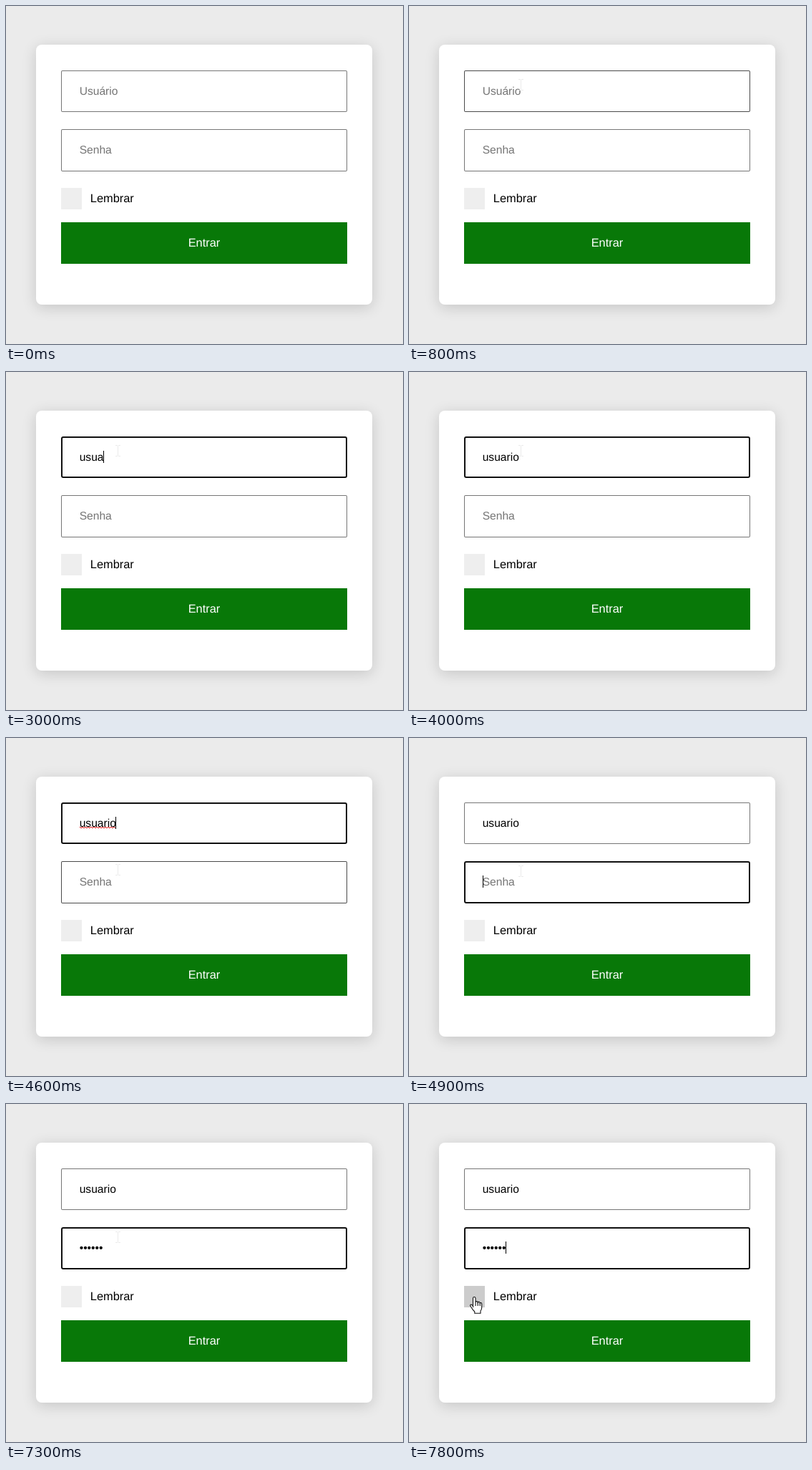
These frames come from a looping animation (555 by 472 pixels, 8000 ms). An HTML page with a canvas:

```html
<!DOCTYPE html>
<html lang="pt">
<head>
<meta charset="utf-8">
<title>Login</title>
<style>
  html, body { margin: 0; width: 100%; height: 100%; overflow: hidden; background: #ebebeb; }
  canvas { display: block; }
</style>
</head>
<body>
<canvas id="stage" width="555" height="472"></canvas>
<script>
const ctx = document.getElementById('stage').getContext('2d');
const LOOP = 8000, STEP = 100;
const FAMILY = '"Liberation Sans", Arial, sans-serif';
const TEXT_X = 102.7;

const userField = { y: 90, h: 58, hint: 'Usuário', value: 'usuario', keys: [1800, 2400, 2800, 3000, 3200, 3400, 3500] };
const passField = { y: 172, h: 59, hint: 'Senha', value: '••••••', keys: [5700, 6000, 6200, 6400, 6600, 6800] };
const FOCUS_USER = 1000, FOCUS_PASS = 4900;
const caretOff = [[1500, 1800], [2300, 2400], [4000, 4100], [5400, 5700], [7300, 7800]];

// time, x, y of the pointer
const pointerPath = [
  [500, 156, 97], [600, 156, 103], [800, 156, 110],
  [4200, 156, 110], [4300, 156, 122], [4400, 156, 142], [4500, 156, 174], [4600, 156, 184], [4900, 156, 186],
  [7400, 156, 186], [7500, 140, 204], [7600, 120, 228], [7700, 100, 260], [7800, 91, 269]
];

const hand = new Path2D('M4.5 15V2.2Q4.5 .5 6.2 .5T8 2.2V8Q8.2 6.6 9.6 6.6T11.2 8.2Q11.6 7.2 12.8 7.4T14.2 9' +
  'Q14.8 8.2 15.7 8.6T16.7 10.4V15.5Q16.6 18 15 20V23.2H6.8V21Q4 18.5 2.6 15.8L.7 12.9Q.3 11 2 11Q3.4 11.6 4.5 13.2Z');
const knuckles = new Path2D('M8 8V13M11.2 8.2V13M14.2 9V13');

function box(x, y, w, h, r, color) {
  ctx.fillStyle = color;
  ctx.beginPath();
  ctx.roundRect(x, y, w, h, r);
  ctx.fill();
}

function text(str, x, y, size, color, align = 'left') {
  ctx.font = size + 'px ' + FAMILY;
  ctx.textAlign = align;
  ctx.fillStyle = color;
  ctx.fillText(str, x, y);
}

function pointerAt(t) {
  if (t < pointerPath[0][0]) return null;
  const i = pointerPath.findIndex(p => p[0] > t);
  if (i < 0) {
    const [, x, y] = pointerPath[pointerPath.length - 1];
    return { x, y };
  }
  const [t0, x0, y0] = pointerPath[i - 1], [t1, x1, y1] = pointerPath[i];
  const k = (t - t0) / (t1 - t0);
  return { x: x0 + (x1 - x0) * k, y: y0 + (y1 - y0) * k };
}

const over = (p, y, h) => p !== null && p.y >= y && p.y < y + h;

function drawField(f, t, focused, hovered) {
  const line = focused ? 2 : 1;
  box(77, f.y, 400, f.h, focused ? 3 : 2, focused ? '#101010' : hovered ? '#4a4a4a' : '#767676');
  box(77 + line, f.y + line, 400 - 2 * line, f.h - 2 * line, 1, '#fff');

  const typed = f.value.slice(0, f.keys.filter(k => k <= t).length);
  const base = f.y + 34;
  text(typed || f.hint, TEXT_X, base, 15.6, typed ? '#000' : '#757575');

  if (focused && !caretOff.some(([a, b]) => t >= a && t < b)) {
    const x = typed ? Math.floor(TEXT_X + ctx.measureText(typed).width) : 103;
    ctx.fillStyle = '#000';
    ctx.fillRect(x, f.y + 20, 1, 17);
  }
}

function drawSquiggle(x0, x1, y) {
  ctx.beginPath();
  for (let x = x0, i = 0; x <= x1; x += 2, i++) ctx.lineTo(x, y + (i % 2 ? 1 : -1));
  ctx.strokeStyle = '#e01010';
  ctx.lineWidth = 1;
  ctx.stroke();
}

function drawBeam(x, y) {
  ctx.fillStyle = '#ebebeb';
  ctx.fillRect(x, y - 7, 1, 14);
  for (const edge of [y - 8, y + 7]) {
    ctx.fillRect(x - 3, edge, 3, 1);
    ctx.fillRect(x + 1, edge, 3, 1);
  }
}

function drawHand(x, y) {
  ctx.save();
  ctx.translate(x - 6, y);
  ctx.fillStyle = '#fff';
  ctx.fill(hand);
  ctx.strokeStyle = '#111';
  ctx.lineWidth = 1.1;
  ctx.stroke(hand);
  ctx.stroke(knuckles);
  ctx.restore();
}

function drawCard() {
  ctx.fillStyle = '#ebebeb';
  ctx.fillRect(0, 0, 555, 472);
  ctx.save();
  ctx.shadowColor = 'rgba(0, 0, 0, .16)';
  ctx.shadowBlur = 20;
  ctx.shadowOffsetY = 4;
  box(42, 54, 470, 363, 8, '#fff');
  ctx.restore();
}

function draw(t) {
  const pointer = pointerAt(t);
  const onBox = over(pointer, 250, 46);

  drawCard();
  drawField(userField, t, t >= FOCUS_USER && t < FOCUS_PASS, over(pointer, 90, 58));
  drawField(passField, t, t >= FOCUS_PASS, over(pointer, 172, 59));
  if (t >= 4300 && t < FOCUS_PASS) drawSquiggle(103, 154, 125);

  box(77, 254, 29, 30, 0, onBox ? '#ccc' : '#eee');
  text('Lembrar', 117.8, 274, 16.4, '#000');
  box(77, 302, 400, 58, 0, '#087808');
  text('Entrar', 277, 336, 16.4, '#fff', 'center');

  if (!pointer) return;
  const x = Math.round(pointer.x), y = Math.round(pointer.y);
  if (onBox) drawHand(x, y);
  else drawBeam(x, y);
}

ctx.textRendering = 'geometricPrecision';
const start = performance.now();
function tick() {
  const t = (performance.now() - start) % LOOP;
  draw(Math.floor(t / STEP) * STEP);
  requestAnimationFrame(tick);
}
tick();
</script>
</body>
</html>
```
